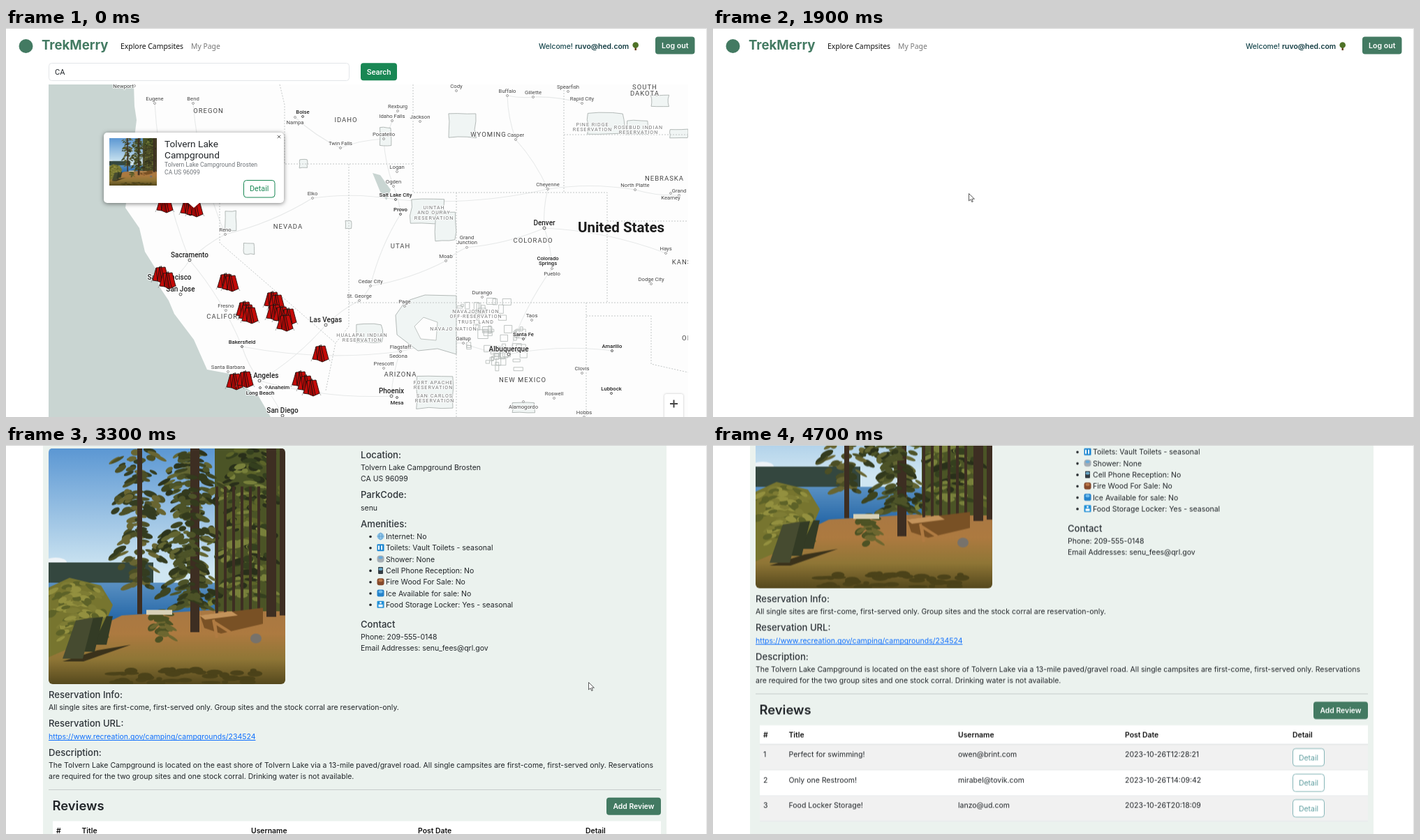
An HTML page with a canvas for the animation above (5710 ms loop, 1004 by 558 pixels).

```html
<!DOCTYPE html>
<html lang="en">
<head>
<meta charset="utf-8">
<title>Campsite finder</title>
<style>
html, body { margin: 0; width: 100%; height: 100%; overflow: hidden; background: #fff; }
canvas { display: block; width: 1004px; height: 558px; }
</style>
</head>
<body>
<canvas id="stage" width="1004" height="558"></canvas>
<script>
const W = 1004, H = 558, LOOP = 5710;
const stage = document.getElementById('stage').getContext('2d');
let g = stage;

const UI = 'Inter, sans-serif', MAP = 'Roboto, sans-serif', NAV = '"Noto Sans", sans-serif';
const GREEN = '#198754', PINE = '#437a62', INK = '#212529', SEA = '#c9d5d2';
const PLACE = 'Tolvern Lake Campground', TOWN = PLACE + ' Brosten', ZIP = 'CA US 96099';

// ---- helpers ----
function text(s, x, y, font, color = INK, align = 'left', gap = 0) {
  g.font = font;
  g.fillStyle = color;
  g.textAlign = align;
  g.letterSpacing = gap + 'px';
  g.fillText(s, x, y);
}

function rect(x, y, w, h, fill) {
  g.fillStyle = fill;
  g.fillRect(x, y, w, h);
}

function paint(fill, line, width = 1) {
  if (fill) { g.fillStyle = fill; g.fill(); }
  if (line) { g.strokeStyle = line; g.lineWidth = width; g.stroke(); }
}

function box(x, y, w, h, r, fill, line) {
  g.beginPath();
  g.roundRect(x, y, w, h, r);
  paint(fill, line);
}

function trace(p) {
  g.beginPath();
  for (let i = 0; i < p.length; i += 2) g.lineTo(p[i], p[i + 1]);
}

function poly(p, fill, line, width) {
  trace(p);
  g.closePath();
  paint(fill, line, width);
}

function path(p, line, width) {
  trace(p);
  paint(null, line, width);
}

function disc(x, y, rx, fill, line, ry = rx, tilt = 0) {
  g.beginPath();
  g.ellipse(x, y, rx, ry, tilt, 0, Math.PI * 2);
  paint(fill, line, 0.8);
}

function fade(top, bottom, ...colors) {
  const f = g.createLinearGradient(0, top, 0, bottom);
  colors.forEach((c, i) => f.addColorStop(i / (colors.length - 1), c));
  return f;
}

function random(seed) {
  return () => (seed = (seed * 16807) % 2147483647) / 2147483647;
}

function layer(w, h, draw) {
  const c = document.createElement('canvas');
  c.width = w;
  c.height = h;
  g = c.getContext('2d');
  draw();
  g = stage;
  return c;
}

// value of the last key whose time has passed
const at = (keys, t) => keys.reduce((v, [time, value]) => t >= time ? value : v, keys[0][1]);
const clamp = (v, a = 0, b = 1) => Math.max(a, Math.min(b, v));

// ---- lakeside picture ----
const photo = layer(339, 339, () => {
  const rnd = random(41);
  function foliage(x, top, bottom, spread, colors, count) {
    for (let i = 0; i < count; i++) {
      const k = rnd(), side = rnd() * 2 - 1;
      const reach = spread * (0.45 + 0.55 * Math.sin(k * 9 + x) ** 2);
      disc(x + side * reach, top + k * (bottom - top) + Math.abs(side) * 8, 4 + rnd() * 7,
        colors[i % colors.length], null, 2 + rnd() * 3, side * 0.6);
    }
  }
  const trunk = (x, w, top, bottom) => rect(x, top, w, bottom - top, '#3d2e22');

  rect(0, 0, 339, 339, fade(0, 175, '#5b97d3', '#cfe6f2'));
  disc(10, 164, 16, '#eef3f7', null, 7);
  rect(0, 164, 150, 32, '#34473f');
  rect(0, 193, 240, 60, fade(190, 245, '#5d93c4', '#2668a8'));
  poly([0, 290, 105, 240, 339, 226, 339, 339, 0, 339], fade(230, 339, '#a97843', '#ad7a40', '#8f7636', '#54481d'));

  rect(238, 0, 101, 234, '#4b5426');
  foliage(285, 0, 215, 56, ['#5c6429', '#343f1e', '#78803b', '#292f1a'], 190);
  foliage(130, 0, 195, 37, ['#4c4f26', '#343c20', '#686532'], 135);
  foliage(204, 0, 225, 46, ['#3d4420', '#2c331b', '#626532', '#4d5429'], 250);
  trunk(127, 7, 0, 238);
  trunk(203, 13, 0, 264);
  for (let i = 0; i < 6; i++) trunk(239 + i * 12, 4, 55, 237);
  trunk(312, 14, 0, 242);
  trunk(331, 8, 0, 240);
  foliage(202, 30, 215, 24, ['#333a1d', '#4d5328'], 70);
  foliage(164, 230, 270, 16, ['#4d5224', '#6d6730'], 30);

  poly([0, 200, 30, 186, 75, 197, 92, 225, 74, 268, 0, 300], '#77752f');
  foliage(38, 190, 270, 42, ['#93903f', '#5d6228', '#7e7c34'], 90);
  poly([20, 306, 50, 306, 118, 282, 70, 290], '#3a321b');
  for (const i of [2, 1, 0]) {
    const x = 20 + i * 22, y = 302 - i * 10;
    poly([x, y, x + 19, y - 55 + i * 7, x + 44 - i * 8, y - 59 + i * 9, x + 29 - i * 5, y], i ? '#333b25' : '#464b30');
  }
  rect(140, 232, 37, 7, '#d8d2b8');
  poly([217, 240, 307, 229, 307, 252, 247, 266, 223, 258], '#795125');
  poly([216, 240, 262, 234, 271, 240, 224, 246], '#c3935b');
  path([236, 246, 241, 272, 238, 250, 260, 264], '#b07b42', 4);
  disc(297, 273, 8, '#77726b', null, 7);
  for (let i = 0; i < 40; i++)
    disc(90 + rnd() * 210, 318 + rnd() * 19, 4 + rnd() * 10, '#4b4219', null, 2 + rnd() * 3);
});

// ---- map ----
const COAST = [183, 81, 184, 112, 187, 132, 177, 215, 171, 258, 191, 287, 199, 321, 216, 348, 219, 370, 233, 391,
  241, 410, 269, 447, 288, 490, 326, 497, 340, 514, 361, 527, 379, 558];
const BORDERS = [
  [392, 81, 399, 110, 399, 195], [180, 195, 583, 195], [583, 81, 583, 236, 861, 236, 861, 394],
  [861, 277, 977, 277], [799, 81, 799, 236], [799, 153, 977, 153], [491, 195, 491, 428, 472, 452],
  [306, 195, 306, 308, 472, 452, 458, 520], [491, 394, 977, 394], [645, 236, 645, 558],
  [831, 394, 831, 558], [831, 413, 924, 413, 924, 482, 977, 494]];

// name, label centre, then the dot's offset where it is not just below; * marks a larger town
const WEST = [
  ['Newport', 168, 83, 16, 0], ['Eugene', 213, 101], ['Bend', 268, 101], ['*Boise', 425, 120], ['Nampa', 414, 135, 0, -7],
  ['Rexburg', 561, 112], ['Idaho Falls', 553, 126], ['Jackson', 593, 127], ['Pocatello', 541, 152],
  ['Twin Falls', 479, 165], ['Logan', 560, 199], ['Ogden', 555, 220], ['*Salt Lake City', 558, 239],
  ['*Provo', 565, 260], ['Elko', 439, 237], ['Reno', 314, 289], ['Moab', 630, 327], ['Cedar City', 522, 363],
  ['St. George', 506, 384], ['Page', 571, 392], ['Fresno', 315, 398], ['*Bakersfield', 338, 450],
  ['Santa Barbara', 318, 486], ['*Long Beach', 364, 523, 0, -7], ['*Anaheim', 391, 515, -18, 0],
  ['Flagstaff', 565, 457], ['Sedona', 562, 470, 3, -6], ['Prescott', 541, 481], ['*Mesa', 560, 537, 0, -7]];
const EAST = [
  ['Cody', 645, 83], ['Buffalo', 718, 90], ['Gillette', 755, 92], ['Spearfish', 805, 84], ['Rapid City', 825, 101],
  ['Casper', 730, 153], ['Cheyenne', 776, 224], ['North Platte', 901, 225], ['Grand', 964, 233], ['Kearney', 952, 243, 0, -6],
  ['Hays', 945, 316], ['Dodge City', 924, 360], ['Grand|Junction', 660, 300], ['*Colorado|Springs', 776, 330, 6, 8],
  ['Pueblo', 782, 352, 0, -7], ['Durango', 682, 379], ['Taos', 753, 412], ['*Santa Fe', 741, 439], ['Gallup', 655, 445],
  ['*Amarillo', 868, 456], ['Clovis', 825, 488], ['*Lubbock', 867, 517], ['Roswell', 785, 524],
  ['Alamogordo', 741, 543, 0, -7], ['Hobbs', 828, 551]];
const CITIES = [
  ['*Sacramento', 263, 325], ['*San Francisco', 234, 357], ['*San Jose', 250, 374], ['*Las Vegas', 458, 418],
  ['*Los Angeles', 363, 498], ['*San Diego', 396, 548], ['*Denver', 771, 279], ['*Albuquerque', 720, 460], ['*Phoenix', 552, 520]];
const ROADS = [
  'San Francisco,Sacramento,Reno,Elko,Salt Lake City,Cheyenne,North Platte,Grand',
  'Eugene,Sacramento,Bakersfield,Los Angeles,San Diego',
  'Nampa,Twin Falls,Pocatello,Ogden,Provo,Cedar City,St. George,Las Vegas,Los Angeles',
  'Rexburg,Idaho Falls,Pocatello', 'Cedar City,Moab,Grand|Junction,Denver,Hays',
  'Buffalo,Casper,Cheyenne,Denver,Pueblo,Albuquerque', 'Bakersfield,Flagstaff,Gallup,Albuquerque,Amarillo',
  'Los Angeles,Phoenix,Flagstaff', 'Buffalo,Gillette,Rapid City', 'Bend,Reno'];
const STATES = [
  ['OREGON', 290, 119], ['IDAHO', 487, 132], ['WYOMING', 691, 153], ['NEVADA', 404, 285], ['UTAH', 565, 313],
  ['COLORADO', 755, 305], ['ARIZONA', 565, 497], ['NEW MEXICO', 740, 505], ['CALIFORNIA', 319, 414],
  ['NEBRASKA', 943, 216], ['SOUTH|DAKOTA', 915, 85], ['KANSAS', 975, 336], ['OKLAHOMA', 998, 445]];
const LANDS = [
  ['PINE RIDGE|RESERVATION', 840, 138], ['ROSEBUD INDIAN|RESERVATION', 906, 142], ['UINTAH|AND OURAY|RESERVATION', 613, 257],
  ['NAVAJO NATION|OFF-RESERVATION|TRUST LAND', 673, 406], ['NAVAJO NATION', 641, 431],
  ['HUALAPAI INDIAN|RESERVATION', 510, 440], ['FORT APACHE|RESERVATION', 612, 508], ['SAN CARLOS|RESERVATION', 614, 527]];
// x, y, width, height of the reservations
const AREAS = [
  [633, 122, 41, 36], [831, 121, 56, 32], [888, 132, 33, 21], [578, 244, 52, 37], [614, 262, 31, 45],
  [587, 498, 55, 49], [500, 424, 40, 28], [420, 188, 12, 13], [313, 261, 17, 30], [486, 276, 9, 12],
  [340, 308, 16, 17], [923, 96, 27, 17], [535, 142, 17, 27], [950, 145, 27, 13], [724, 537, 34, 15]];
// first tent, how many, step to the next
const TENTS = [
  [227, 253, 1], [261, 257, 2, 9, 2], [221, 354, 2, 10, 8], [314, 364, 2, 7, 2], [341, 404, 3, 4, 4], [381, 390, 2, 6, 4],
  [384, 408, 3, 10, 3], [399, 423, 1], [450, 467, 1], [327, 507, 2, 15, -3], [421, 504, 3, 8, 6]];

function label(name, x, y, size, color, weight = 400, gap = 0) {
  name.split('|').forEach((s, i) => {
    const base = y + size * 0.355 + i * Math.max(7.7, size * 0.95);
    g.font = `${weight} ${size}px ${MAP}`;
    g.textAlign = 'center';
    g.letterSpacing = gap + 'px';
    g.lineWidth = 2;
    g.strokeStyle = 'rgba(255,255,255,.8)';
    g.strokeText(s, x, base);
    text(s, x, base, g.font, color, 'center', gap);
  });
}

const spots = {};
function locate(list, drop) {
  for (const [name, x, y, dx = 0, dy = drop + 7.7 * (name.split('|').length - 1)] of list)
    spots[name.replace('*', '')] = [x + dx, y + dy];
}

function towns(list, size, r) {
  for (const [name, x, y] of list) {
    const plain = name.replace('*', ''), big = plain !== name;
    disc(...spots[plain], r, '#fff', big ? '#333' : '#888');
    label(plain, x, y, size, big ? '#222' : '#444', big ? 500 : 400);
  }
}

function road(names) {
  const p = names.split(',').map(n => spots[n]);
  g.beginPath();
  g.moveTo(...p[0]);
  p.slice(1).forEach(([x, y], i) => {
    const [a, b] = p[i], bend = i % 2 ? 0.08 : -0.08;
    g.quadraticCurveTo((a + x) / 2 + (y - b) * bend, (b + y) / 2 + (a - x) * bend, x, y);
  });
  paint(null, '#e7e9e9', 1.1);
}

function area(x, y, w, h, rnd) {
  const p = [];
  for (let i = 0; i < 12; i++) {
    const a = i * Math.PI / 6 + 0.26, k = 0.86 + 0.14 * rnd();
    p.push(x + w * (0.5 + k * clamp(Math.cos(a) * 0.7, -0.5, 0.5)), y + h * (0.5 + k * clamp(Math.sin(a) * 0.7, -0.5, 0.5)));
  }
  poly(p, '#f0f5f4', '#a3aaa8', 0.8);
}

function tent(x, y) {
  path([x - 13, y + 11, x - 6, y - 6, x + 1, y - 12, x + 14, y + 11], '#777', 0.6);
  poly([x - 11, y + 8, x - 6, y - 10, x + 7, y - 11, x + 12, y + 8, x + 3, y + 12, x - 4, y + 9], '#c40a08', '#29100d', 0.9);
  poly([x - 2, y + 10, x - 1, y - 11, x + 4, y + 11], '#930806');
  path([x - 6, y - 10, x - 4, y + 9, x - 1, y - 12, x + 3, y + 12], '#29100d', 0.9);
  path([x + 1, y - 13, x + 6, y + 10], '#29100d', 1);
}

function drawMap() {
  const rnd = random(7);
  g.save();
  g.beginPath();
  g.rect(61, 81, 916, 477);
  g.clip();
  rect(61, 81, 916, 477, '#fdfdfd');
  g.lineJoin = 'round';
  locate(WEST, 7);
  locate(EAST, 7);
  locate(CITIES, 8);
  ROADS.forEach(road);
  poly([61, 81, ...COAST, 61, 558], SEA);
  poly([525, 208, 536, 211, 551, 232, 545, 247, 536, 235], SEA);
  poly([558, 412, 572, 392, 600, 383, 645, 384, 645, 468, 618, 460, 590, 463, 560, 440], '#f0f5f4', '#a3aaa8', 0.8);
  for (const a of AREAS) area(...a, rnd);
  poly([585, 428, 598, 415, 618, 422, 616, 448, 594, 446], '#fdfdfd', '#b0b6b4', 0.8);
  for (let i = 0; i < 50; i++) {
    const east = i > 37;
    g.strokeRect((east ? 698 : 646) + rnd() * (east ? 40 : 68), (east ? 425 : 386) + rnd() * (east ? 68 : 96), 3 + rnd() * 12, 3 + rnd() * 10);
  }
  g.setLineDash([2, 2]);
  for (const b of BORDERS) path(b, '#c3c7c7', 1);
  g.setLineDash([]);
  for (const l of LANDS) label(...l, 7.1, '#777', 400, 1);
  for (const s of STATES) label(...s, 9.5, '#444', 400, 1);
  towns(WEST, 7.7, 1.5);
  towns(EAST, 7.7, 1.5);
  towns(CITIES, 10, 2);
  label('United States', 881, 286, 20.5, '#1c1c1c', 700);
  for (const [x, y, n, dx, dy] of TENTS)
    for (let i = 0; i < n; i++) tent(x + (i && i * dx), y + (i && i * dy));
  g.shadowColor = 'rgba(0,0,0,.25)';
  g.shadowBlur = 3;
  box(943, 525, 27, 50, 3, '#fff');
  g.shadowBlur = 0;
  rect(951, 538, 11, 2, '#444');
  rect(955.5, 533.5, 2, 11, '#444');
  g.restore();
}

// ---- first page ----
function button(s, x, y, w, font, fill) {
  box(x, y, w, 25, 4, fill);
  text(s, x + w / 2, y + 16.3, font, '#fff', 'center');
}

function header() {
  disc(28.5, 26, 10, PINE);
  text('TrekMerry', 51, 31, `700 18.6px ${UI}`, PINE);
  text('Explore Campsites', 164, 29.5, `10.4px ${NAV}`, '#111');
  text('My Page', 265, 29.5, `10.4px ${NAV}`, '#777');
  text('Welcome!', 763, 30, `500 10.3px ${UI}`, '#17474d');
  text('ruvo@hed.com', 815, 30, `600 10.4px ${UI}`, '#123c42');
  rect(900.5, 26, 2.5, 6, '#6b4424');
  disc(901.7, 24.5, 4.3, '#4f7328');
  button('Log out', 930, 12.5, 56.5, `600 10.6px ${UI}`, PINE);
}

const searchPage = layer(W, H, () => {
  header();
  box(61.5, 50.5, 430, 25, 4, '#fff', '#e3e6e9');
  text('CA', 70, 66.5, `11px ${MAP}`);
  button('Search', 508, 50.3, 52, `500 11.2px ${MAP}`, GREEN);
  drawMap();
  g.shadowColor = 'rgba(0,0,0,.5)';
  g.shadowBlur = 6;
  g.shadowOffsetY = 1;
  box(140, 150, 258, 101, 5, '#fff');
  g.shadowColor = 'transparent';
  poly([260, 250, 278, 250, 269, 258], '#fff');
  g.imageSmoothingQuality = 'high';
  g.drawImage(photo, 148, 158, 68, 68);
  text('Tolvern Lake', 227, 171, `13.7px ${MAP}`);
  text('Campground', 227, 187, `13.7px ${MAP}`);
  text(TOWN, 227, 199, `8.7px ${MAP}`, '#70757a');
  text(ZIP, 227, 210, `8.7px ${MAP}`, '#70757a');
  for (const d of [2.2, -2.2]) path([391 - d, 153.8, 391 + d, 158.2], '#555', 0.9);
});

function popupButton(hover) {
  box(340.5, 218.5, 44.5, 24.5, 4, '#fff', GREEN);
  g.globalAlpha = hover;
  box(340.5, 218.5, 44.5, 24.5, 4, '#1f8a50');
  g.globalAlpha = 1;
  text('Detail', 362.7, 234, `10.8px ${MAP}`, hover > 0.4 ? '#fff' : GREEN, 'center');
}

// ---- campsite page ----
const body = (s, x, y, color) => text(s, x, y, `10.5px ${UI}`, color);
const heading = (s, x, y) => text(s, x, y, `500 13.1px ${UI}`, '#2d3338');

// text, icon colour, icon detail colour, icon corner radius
const AMENITIES = [
  ['Internet: No', '#8fc4e8', '#5b9cc9', 5], ['Toilets: Vault Toilets - seasonal', '#1c86d1', '#fff', 1],
  ['Shower: None', '#a5adb4', '#65aadb', 4], ['Cell Phone Reception: No', '#333c43', '#69a8c8', 1],
  ['Fire Wood For Sale: No', '#85492b', '#bd7748', 3], ['Ice Available for sale: No', '#2583cb', '#72bff0', 2],
  ['Food Storage Locker: Yes - seasonal', '#2391d8', '#fff', 1]];
const REVIEWS = [
  ['Perfect for swimming!', 'owen@brint.com', '2023-10-26T12:28:21'],
  ['Only one Restroom!', 'mirabel@tovik.com', '2023-10-26T14:09:42'],
  ['Food Locker Storage!', 'lanzo@ud.com', '2023-10-26T20:18:09']];
const COLUMNS = [72, 108.5, 351, 590, 830];

function icon(i, y, fill, mark, r) {
  const slim = i === 3 ? 1.5 : 0;
  box(531.5 + slim, y - 5, 10 - 2 * slim, 10, r, fill);
  if (i === 0) {
    disc(536.5, y, 2.2, null, mark, 5);
    path([531.5, y, 541.5, y], mark, 0.8);
  } else if (i === 1) {
    for (const d of [-3, 1]) rect(536 + d, y - 3, 2, 6, mark);
  } else if (i === 6) {
    rect(533.5, y, 6, 3.5, mark);
    disc(536.5, y - 2.5, 1.4, mark);
  } else {
    disc(536.5, y - 2, 3, mark, null, 2);
  }
}

function star(x, y, r) {
  const p = [];
  for (let i = 0; i < 10; i++) {
    const a = i * Math.PI / 5 - Math.PI / 2, d = i % 2 ? r * 0.45 : r;
    p.push(x + d * Math.cos(a), y + d * Math.sin(a));
  }
  g.lineJoin = 'round';
  poly(p, null, INK, 1.2);
}

const sitePage = layer(W, 800, () => {
  header();
  box(53, 50.5, 893, 800, 5, '#ebf2ee');
  text(`< ${PLACE} >`, 72, 81.5, `600 21.4px ${UI}`);
  star(928.5, 64.5, 10);
  g.save();
  g.beginPath();
  g.roundRect(61, 97.5, 339, 338.5, 6);
  g.clip();
  g.drawImage(photo, 61, 97.5);
  g.restore();

  heading('Location:', 508, 111.5);
  body(TOWN, 508, 129);
  body(ZIP, 508, 145);
  heading('ParkCode:', 508, 169);
  body('senu', 508, 187);
  heading('Amenities:', 508, 210.5);
  AMENITIES.forEach(([s, ...look], i) => {
    const y = 224 + i * 16.3;
    disc(522, y + 0.5, 1.8, INK);
    icon(i, y, ...look);
    body(s, 544, y + 4);
  });
  heading('Contact', 508, 354.5);
  body('Phone: 209-555-0148', 508, 372);
  body('Email Addresses: senu_fees@qrl.gov', 508, 388);

  heading('Reservation Info:', 61, 455.5);
  body('All single sites are first-come, first-served only. Group sites and the stock corral are reservation-only.', 61, 473);
  heading('Reservation URL:', 61, 497);
  const url = 'https://www.recreation.gov/camping/campgrounds/234524';
  body(url, 61, 514.5, '#0d6efd');
  rect(61, 516, g.measureText(url).width, 1, '#0d6efd');
  heading('Description:', 61, 538.5);
  body('The Tolvern Lake Campground is located on the east shore of Tolvern Lake via a 13-mile paved/gravel road. All single campsites are first-come, first-served only. Reservations', 61, 555.5);
  body('are required for the two group sites and one stock corral. Drinking water is not available.', 61, 572);
  rect(61, 587, 877, 1, '#c6cccb');

  text('Reviews', 66.5, 616.5, `600 18.4px ${UI}`);
  button('Add Review', 860, 598.7, 78, `600 10.4px ${UI}`, PINE);
  rect(67, 632.5, 871, 27.5, '#fff');
  ['#', 'Title', 'Username', 'Post Date', 'Detail'].forEach((s, i) => text(s, COLUMNS[i], 650, `600 10.4px ${UI}`, '#111'));
  rect(67, 659.5, 871, 1, '#cfd4d7');
  REVIEWS.forEach((review, i) => {
    const y = 660.5 + i * 36.6;
    rect(67, y, 871, 36.6, i % 2 ? '#fff' : '#f1f1f1');
    rect(67, y + 36, 871, 0.7, '#dee2e6');
    [i + 1, ...review].forEach((s, k) => body(s, COLUMNS[k], y + 17.5));
    box(830.5, y + 5.5, 45, 25, 4, '#fff', '#85b5b7');
    text('Detail', 853, y + 22, `10.5px ${UI}`, '#5f9ea0', 'center');
  });
});

// ---- pointer ----
function arrow(x, y) {
  g.save();
  g.translate(x, y);
  poly([0.5, 0.5, 0.5, 11, 3, 8.8, 4.8, 12.6, 6.3, 12, 4.8, 8.2, 8.4, 8.2], '#fff', '#333', 0.8);
  g.restore();
}

function hand(x, y) {
  g.beginPath();
  g.roundRect(x + 3, y, 2.4, 9, 1.2);
  g.roundRect(x + 2.5, y + 5, 7.5, 8.5, 2);
  paint(null, '#222', 1.6);
  paint('#fff');
  poly([x + 3, y + 11, x, y + 7.5, x + 1.4, y + 6.6, x + 3.6, y + 8.4], '#fff', '#222', 0.7);
  for (const d of [5.5, 7.6]) path([x + d, y + 5.5, x + d, y + 8], '#777', 0.5);
}

function pointer(t) {
  if (t < 470 || t >= 4700) return;
  if (t < 1070) {
    const k = Math.floor((t - 470) / 100) / 5, e = k * k * (3 - 2 * k);
    arrow(265 + 100 * e, 493 - 254 * e);
  } else if (t < 1470) {
    if (t >= 1270) disc(367.5, 240, 7.5, 'rgba(230,225,20,.75)');
    hand(363, 237);
  } else if (t < 2180) {
    arrow(366, 237);
  } else if (t < 4600) {
    const k = clamp(Math.floor((t - 2204) / 96) / 5), e = 1 - (1 - k) ** 2;
    arrow(385 + 449 * e, 239 + 101 * e);
  } else {
    arrow(933, 526);
  }
}

// ---- timeline ----
const SCROLL = [[0, 0], [3300, 93], [3400, 140], [3500, 169], [3600, 177], [3700, 180], [3900, 230.5]];
const HOVER = [[0, 0], [1070, 0.5], [1170, 1]];

function draw(t) {
  rect(0, 0, W, H, '#fff');
  if (t < 1470) {
    g.drawImage(searchPage, 0, 0);
    popupButton(at(HOVER, t));
  } else if (t < 2180) {
    header();
  } else {
    g.drawImage(sitePage, 0, -at(SCROLL, t));
  }
  rect(0, 0, W, 1, '#d4d4d4');
  rect(1003, 0, 1, H, '#e2e2e2');
  if (t >= 1070 && t < 1900) rect(0, 557, 334, 1, t < 1780 ? '#858585' : '#c4c4c4');
  pointer(t);
}

const start = performance.now();
function tick() {
  draw((performance.now() - start) % LOOP);
  requestAnimationFrame(tick);
}
tick();
</script>
</body>
</html>
```
